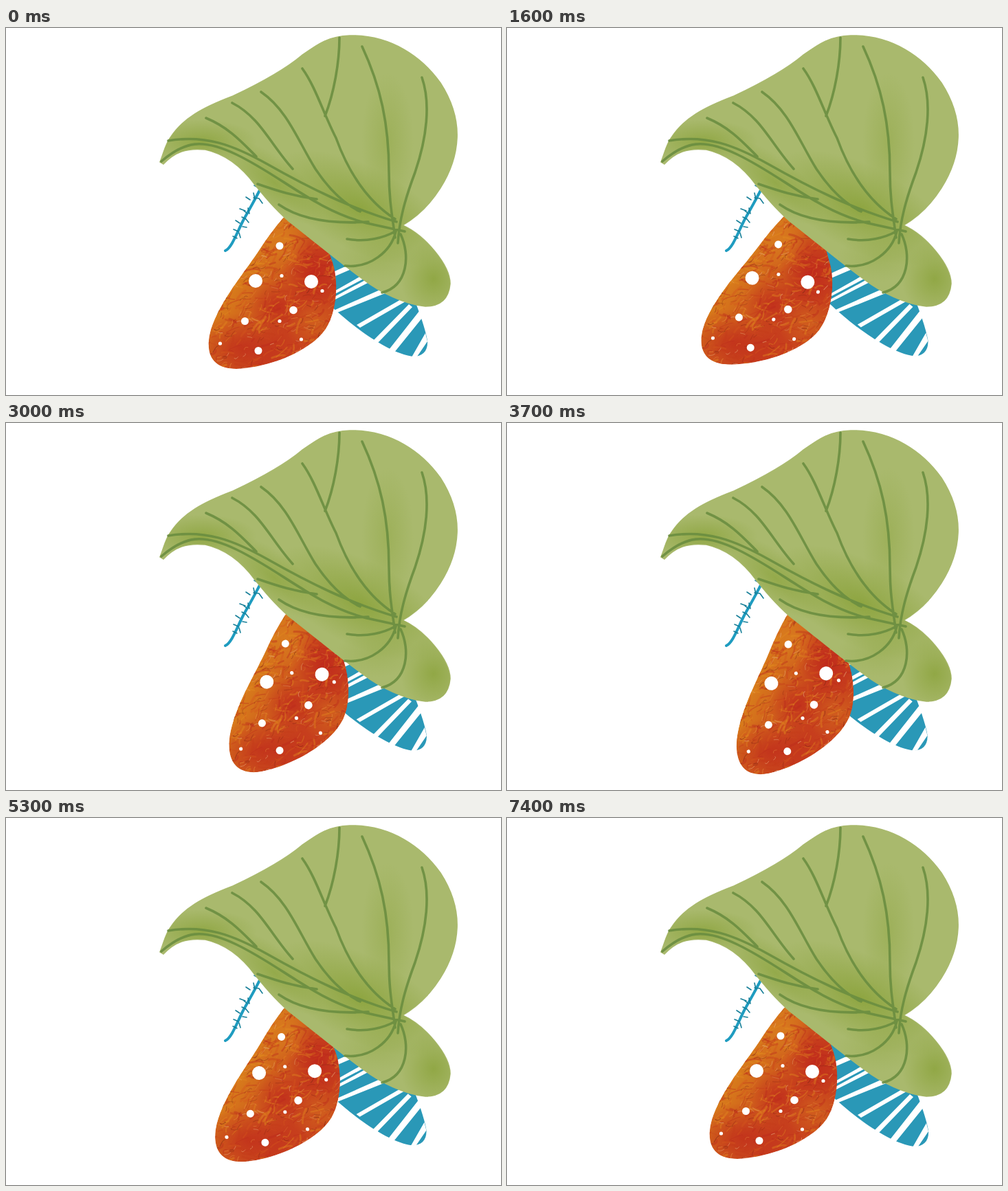
Recreate the animation shown at these times as an HTML page. Size 720 px wide and 534 px high, loop 7500 ms.

```html
<!DOCTYPE html>
<html lang="en">
<head>
<meta charset="utf-8">
<title>Leaf and wings</title>
<style>
html, body { margin: 0; width: 100%; height: 100%; overflow: hidden; background: #fff; }
svg { display: block; }
</style>
</head>
<body>
<svg width="720" height="534" viewBox="0 0 720 534" fill="none" stroke-linecap="round">
  <defs>
    <path id="leafShape" d="M224 195C230 180 232 168 240 158C257 132 285 116 330 99C370 80 405 61 430 40C455 22 470 12 500 11C560 10 605 42 632 80C650 108 657 135 656 160C654 210 620 262 577 287C610 302 646 345 646 372C644 395 632 405 610 405C580 402 545 385 520 366C490 345 450 311 410 280C385 258 372 240 362 228C345 205 322 184 290 177C262 174 245 181 229 198Z"/>
    <path id="wingShape" d="M430 250C405 270 385 298 365 328C345 358 305 405 296 447C290 480 305 496 335 496C380 494 440 473 465 438C483 410 484 365 474 338C465 310 450 270 430 250Z"/>
    <clipPath id="leafClip"><use href="#leafShape"/></clipPath>
    <clipPath id="wingClip"><use href="#wingShape"/></clipPath>
    <linearGradient id="paint" gradientUnits="userSpaceOnUse" x1="350" y1="330" x2="440" y2="385">
      <stop offset="0" stop-color="#d9811b"/>
      <stop offset=".5" stop-color="#d0601c"/>
      <stop offset="1" stop-color="#c8421d"/>
    </linearGradient>
    <radialGradient id="red"><stop stop-color="#c02a1c"/><stop offset="1" stop-color="#c02a1c" stop-opacity="0"/></radialGradient>
    <radialGradient id="orange"><stop stop-color="#d87a1e"/><stop offset="1" stop-color="#d87a1e" stop-opacity="0"/></radialGradient>
    <radialGradient id="shade"><stop stop-color="#8ba33c"/><stop offset="1" stop-color="#8ba33c" stop-opacity="0"/></radialGradient>
  </defs>

  <g id="blue">
    <path fill="#2a98b7" d="M460 310L590 385C601 412 610 438 613 455C614 470 606 478 592 478C560 474 510 440 470 402Z"/>
    <path fill="#fff" d="M465 360L500 344 502 351 465 367ZM465 390L516 361 520 365 465 394ZM465 398L524 366 528 370 465 402ZM470 414L546 380 554 385 482 414ZM510 432L576 394 581 398 515 436ZM534 455L586 402 591 406 540 459ZM557 468L601 412 606 421 564 473ZM590 479L610 444 613 456 598 478Z"/>
  </g>

  <path stroke="#1f9cc0" stroke-width="4" d="M319 324C328 320 335 300 345 280C355 262 362 250 369 236"/>
  <path stroke="#177f98" stroke-width="1.6" d="M361 229l7 4M349 246l6 4M360 240l2 9M360 247l8 1M368 248l5 7M340 263l8 3M352 262l2 8M346 266l5 4M343 275l6 3M349 278l4 5M334 280l6 4M344 289l6 1M331 293l7 3M339 298l2 7M330 303l6 3"/>

  <g id="wing">
    <g clip-path="url(#wingClip)">
      <use href="#wingShape" fill="url(#paint)"/>
      <ellipse cx="345" cy="465" rx="85" ry="50" fill="url(#red)" opacity=".8"/>
      <ellipse cx="448" cy="355" rx="45" ry="60" fill="url(#red)"/>
      <ellipse cx="395" cy="405" rx="45" ry="40" fill="url(#red)" opacity=".8"/>
      <ellipse cx="450" cy="430" rx="45" ry="40" fill="url(#orange)" opacity=".5"/>
      <ellipse cx="400" cy="310" rx="40" ry="45" fill="url(#orange)"/>
      <g id="strokes"></g>
    </g>
    <g id="dots" fill="#fff"></g>
  </g>

  <use href="#leafShape" fill="#a9b96d" stroke="#a9b96d" stroke-width="1.6"/>
  <g clip-path="url(#leafClip)" fill="url(#shade)">
    <ellipse cx="515" cy="262" rx="140" ry="62" transform="rotate(27 515 262)" opacity=".9"/>
    <ellipse cx="285" cy="165" rx="80" ry="32" opacity=".8"/>
    <ellipse cx="390" cy="225" rx="90" ry="35" transform="rotate(38 390 225)" opacity=".7"/>
    <ellipse cx="555" cy="165" rx="38" ry="100" opacity=".4"/>
    <ellipse cx="622" cy="365" rx="48" ry="55" opacity=".8"/>
    <ellipse cx="540" cy="335" rx="60" ry="35" opacity=".3"/>
  </g>
  <path stroke="#698d40" stroke-opacity=".87" stroke-width="3.6" d="M485 14C485 50 477 95 464 128M431 59C450 85 462 125 480 160C500 215 530 255 566 278M518 27C545 85 557 140 557 210C557 250 562 275 566 305M605 72C618 110 612 160 595 210C580 250 572 280 570 313M371 93C410 120 425 165 450 205C470 235 490 255 515 267M329 109C370 130 385 170 417 205M291 131C325 145 345 168 364 187M236 164C290 155 330 170 380 198C440 232 500 262 568 282M226 194C260 165 285 160 335 184C400 215 450 265 525 284L580 296M366 227C395 237 420 245 452 249M397 257C430 280 480 285 527 282M496 307C525 312 550 305 566 296M493 346C530 350 560 325 567 296M574 300C588 330 585 375 547 385"/>
</svg>
<script>
const $ = id => document.getElementById(id);

let seed = 7;
const rand = (lo, hi) => {
  seed = (seed * 16807) % 2147483647;
  return lo + (hi - lo) * seed / 2147483647;
};

// Brush marks: count, colours, width, opacity, longest mark
function brush(count, colours, width, opacity, reach) {
  let marks = '';
  for (let i = 0; i < count; i++) {
    const x = rand(290, 485), y = rand(265, 498);
    const angle = rand(-1.4, .5), len = rand(4, reach);
    const dx = Math.cos(angle) * len, dy = Math.sin(angle) * len;
    const colour = colours[Math.floor(rand(0, colours.length))];
    marks += `<path d="M${x} ${y}q${dx / 2 + rand(-4, 4)} ${dy / 2 + rand(-4, 4)} ${dx} ${dy}"
      stroke="${colour}" stroke-width="${rand(.5, width)}" opacity="${opacity}"/>`;
  }
  return marks;
}
$('strokes').innerHTML =
  brush(600, ['#e08a1e', '#d2551c', '#b92a1c', '#c23a1a'], 3.5, .4, 22) +
  brush(150, ['#e9b080', '#e58b3c'], 1.2, .55, 12) +
  brush(110, ['#7a2412', '#8f2a14'], 1.2, .5, 12);

$('dots').innerHTML = [
  [398, 317, 5.5], [363, 368, 10], [444, 369, 10], [418, 410.5, 5.8], [347.5, 426.5, 5.5], [367, 469.5, 5.5],
  [311.5, 459, 2.6], [401, 360.5, 2.6], [460, 382.5, 2.6], [398, 426.5, 2.6], [429.5, 453, 2.6]
].map(([x, y, r]) => `<circle cx="${x}" cy="${y}" r="${r}"/>`).join('');

// Keys are [ms, value], joined by straight lines
const swing = [[0, 0], [1000, 8.7], [3500, -12.7], [5000, 0], [6400, -12.7], [7400, 0], [7500, 0]];
const shrink = [[0, 0], [5000, .014], [6400, 0], [7500, 0]];
function at(keys, t) {
  const i = keys.findIndex(k => k[0] > t);
  const [t0, v0] = keys[i - 1], [t1, v1] = keys[i];
  return v0 + (v1 - v0) * (t - t0) / (t1 - t0);
}

const start = performance.now();
let last = -1;
function draw() {
  const t = Math.floor((performance.now() - start) % 7500 / 100) * 100;
  if (t !== last) {
    last = t;
    $('wing').setAttribute('transform', `rotate(${at(swing, t)} 430 262)`);
    $('blue').setAttribute('transform', `translate(470 330) scale(${1 - at(shrink, t)}) translate(-470 -330)`);
  }
  requestAnimationFrame(draw);
}
draw();
</script>
</body>
</html>
```
